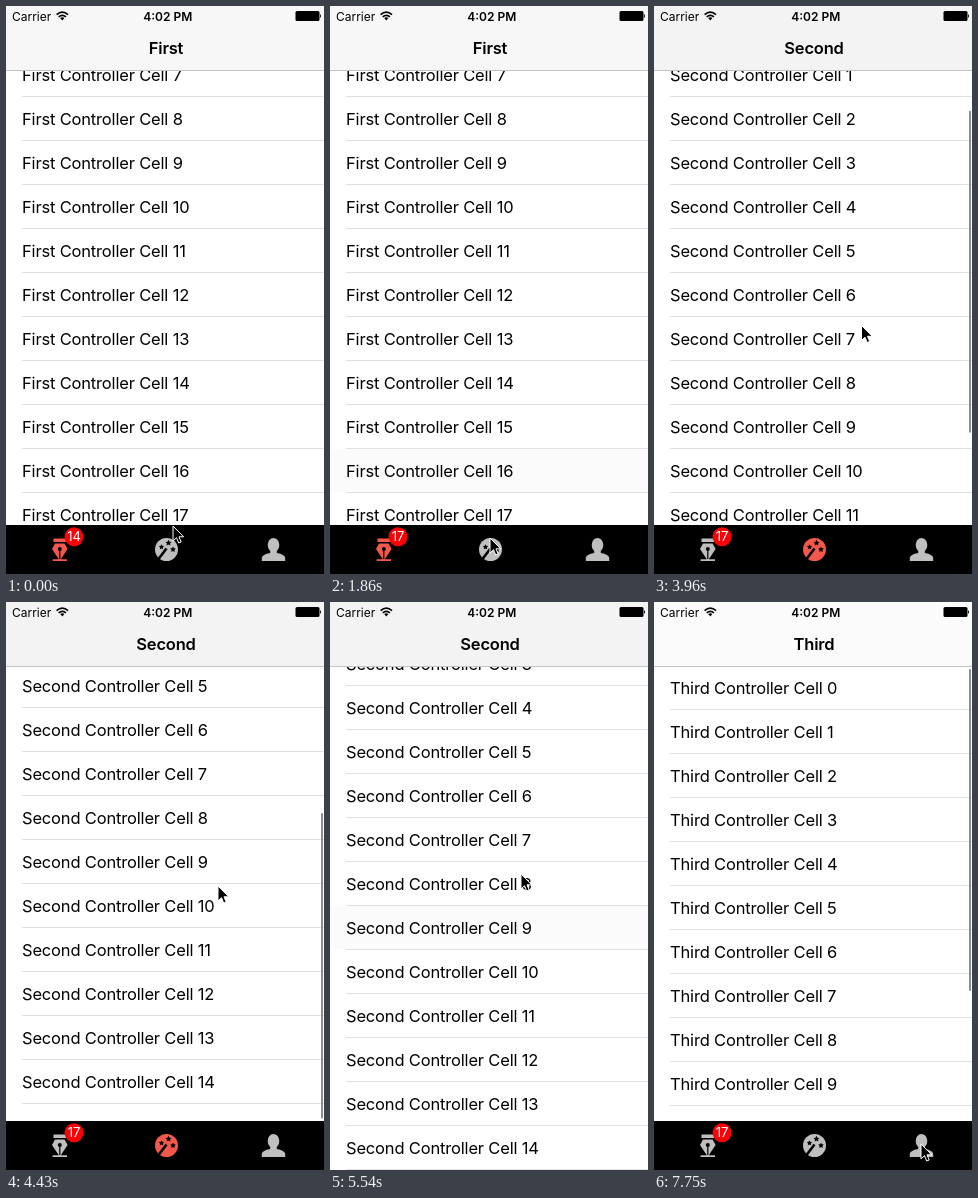
An HTML page for the animation above (8 s loop, 318 by 568 pixels).

```html
<!DOCTYPE html>
<html lang="en">
<head>
<meta charset="utf-8">
<title>Tab bar demo</title>
<style>
  html, body { margin: 0; height: 100%; overflow: hidden; background: #fff; }
  svg { display: block; width: 318px; height: 568px; font-family: Inter, Roboto, "Liberation Sans", sans-serif; }
  .cell { font-size: 16.5px; letter-spacing: -.17px; }
  .title { font-size: 16.5px; font-weight: 600; letter-spacing: -.2px; text-anchor: middle; }
  .status { font-size: 12px; }
</style>
</head>
<body>
<svg viewBox="0 0 318 568">
  <g id="lists"></g>
  <rect id="bar" x="315" width="2" rx="1" fill="#8c8c8c"/>

  <rect id="nav" width="318" height="64"/>
  <rect y="64" width="318" height="1" fill="#c4c4c4"/>
  <text class="status" x="6" y="15">Carrier</text>
  <g fill="none" stroke="#000" stroke-width="1.7">
    <path d="M50.6 8.6Q56.3 3.6 62 8.6M52.7 10.9Q56.3 7.8 59.9 10.9"/>
    <path d="M54.2 12Q56.3 10.4 58.4 12L56.3 14.4Z" fill="#000" stroke="none"/>
  </g>
  <text class="status" x="161.7" y="15" font-weight="600" text-anchor="middle">4:02 PM</text>
  <rect x="289.5" y="5" width="24" height="10" rx="1.5"/>
  <path d="M314 8q2 2 0 4z"/>
  <text id="title" class="title" x="160" y="48"></text>

  <g id="tabs">
    <rect y="519" width="318" height="49"/>
    <g class="icon">
      <path d="M47.5 532.5h12.5v3.6h-12.5zM49 537.5h9.6l3 5.5-6.8 10.2h6.2v1.8H46.6v-1.8h6.2L46 543z"/>
      <path d="M53.8 544v9" stroke="#000" stroke-width="1.2"/>
      <circle cx="53.8" cy="543" r="2" fill="#000"/>
    </g>
    <g class="icon">
      <circle cx="160.5" cy="543.5" r="11.5"/>
      <path d="M152.5 553l8-10.5" stroke="#000" stroke-width="2.6"/>
      <g id="stars"></g>
    </g>
    <g class="icon">
      <ellipse cx="267.5" cy="539" rx="5.8" ry="7"/>
      <path d="M264.2 543h6.6v4q8 1.4 8.4 4.8v3.2h-23.4v-3.2q.4-3.4 8.4-4.8z"/>
    </g>
    <circle cx="68" cy="530.7" r="9.5" fill="#fb0007"/>
    <text id="badge" x="68" y="535" font-size="13" fill="#fff" text-anchor="middle"></text>
  </g>

  <path id="cursor" d="M0 0V15L3.5 11.7 5.7 17 8.2 16 6 10.8H10.7Z" stroke="#fff"/>
</svg>
<script>
const LOOP = 8000, ROW = 44, TOP = 64;
const TO_SECOND = 1980, TO_THIRD = 7350, TINT_DELAY = 630;
const $ = id => document.getElementById(id);
const set = (el, attrs) => { for (const k in attrs) el.setAttribute(k, attrs[k]); };

const linear = (t, a, b) => Math.min(1, Math.max(0, (t - a) / (b - a)));
const ease = (t, a, b) => { const u = linear(t, a, b); return u * u * (3 - 2 * u); };
const pulse = (t, a, b, c, d) => ease(t, a, b) - ease(t, c, d);

// Pointer stops: arrival time and place; each move takes MOVE ms.
const MOVE = 240;
const stops = [
  [0, 167, 520], [300, 155, 533], [540, 165, 510], [920, 167, 462], [1600, 160, 532],
  [3180, 214, 537], [3720, 205, 432], [3960, 207.5, 319.5], [4200, 212, 284], [4910, 191, 272],
  [6600, 215, 503], [6950, 253, 550], [7300, 267, 542]
];
const pointer = t => stops.reduce(([x, y], [end, nx, ny]) => {
  const u = ease(t, end - MOVE, end);
  return [x + (nx - x) * u, y + (ny - y) * u];
}, [167, 520]);

const taps = [{ page: 0, row: 16, time: 900 }, { page: 1, row: 9, time: 5000 }, { page: 1, row: 8, time: 6010 }];
const glow = age => age < 0 ? 0 : 1 - .88 * ease(age, 80, 450) - .12 * linear(age, 1000, 1050);

// Drag with fling past the end, spring back, then the room gained from the hidden tab bar.
const scroll = t => 222 * Math.sin(Math.PI / 2 * linear(t, 3860, 4430))
  - 17 * ease(t, 4640, 4900) - 49 * ease(t, 5040, 5400);

const names = ['First', 'Second', 'Third'];
const lists = names.map((name, n) => {
  const g = document.createElementNS('http://www.w3.org/2000/svg', 'g');
  for (let r = 0; r < (n ? 15 : 20); r++) {
    const y = r * ROW;
    g.innerHTML += `<rect y="${y}" width="318" height="43" fill="#d9d9d9" opacity="0"/>
      <text class="cell" x="16" y="${y + 27.7}">${name} Controller Cell ${r}</text>
      <rect x="16" y="${y + 43}" width="302" height="1" fill="#e0e0e2"/>`;
  }
  $('lists').append(g);
  return g;
});

function star(x, y, r) {
  const points = Array.from({ length: 10 }, (_, k) => {
    const a = k * Math.PI / 5, q = k % 2 ? r / 2 : r;
    return [x + q * Math.sin(a), y - q * Math.cos(a)];
  });
  $('stars').innerHTML += `<polygon points="${points.join(' ')}" fill="#000"/>`;
}
star(155.5, 541, 2.8);
star(162.5, 537, 3.2);
star(167, 543.5, 3);

function draw(t) {
  const page = t < TO_SECOND ? 0 : t < TO_THIRD ? 1 : 2;
  const offset = [325, scroll(t), 0][page];
  lists.forEach((g, n) => set(g, { display: n === page ? 'inline' : 'none' }));
  set(lists[page], { transform: `translate(0 ${TOP - offset})` });
  for (const { page, row, time } of taps) {
    set(lists[page].children[row * 3], { opacity: glow(t - time) });
  }

  // The indicator shrinks against the bottom when the list is pulled too far.
  const y = 67 + Math.min(offset, 205) * .62 + Math.max(0, offset - 205);
  const opacity = pulse(t, 2090, 2260, 2830, 3250) + pulse(t, 3850, 3950, 5000, 5360) + ease(t, 7500, 7740);
  set($('bar'), { y, height: Math.min(322, 516.5 - y), opacity });

  set($('nav'), { fill: ['#f7f7f7', '#f3f3f3', '#fbfbfb'][page] });
  $('title').textContent = names[page];
  $('badge').textContent = t < taps[0].time ? 14 : 17;
  set($('tabs'), { transform: `translate(0 ${49 * pulse(t, 5040, 5360, 6060, 6380)})` });

  // A newly chosen icon is tinted only after a delay.
  const since = t - [-LOOP, TO_SECOND, TO_THIRD][page];
  const active = since < TINT_DELAY ? -1 : page;
  document.querySelectorAll('.icon').forEach((g, n) => set(g, { fill: n === active ? '#f2594b' : '#bfbfbf' }));

  set($('cursor'), { transform: `translate(${pointer(t).join(' ')})` });
}

const start = performance.now();
function tick() {
  draw((performance.now() - start) % LOOP);
  requestAnimationFrame(tick);
}
tick();
</script>
</body>
</html>
```
